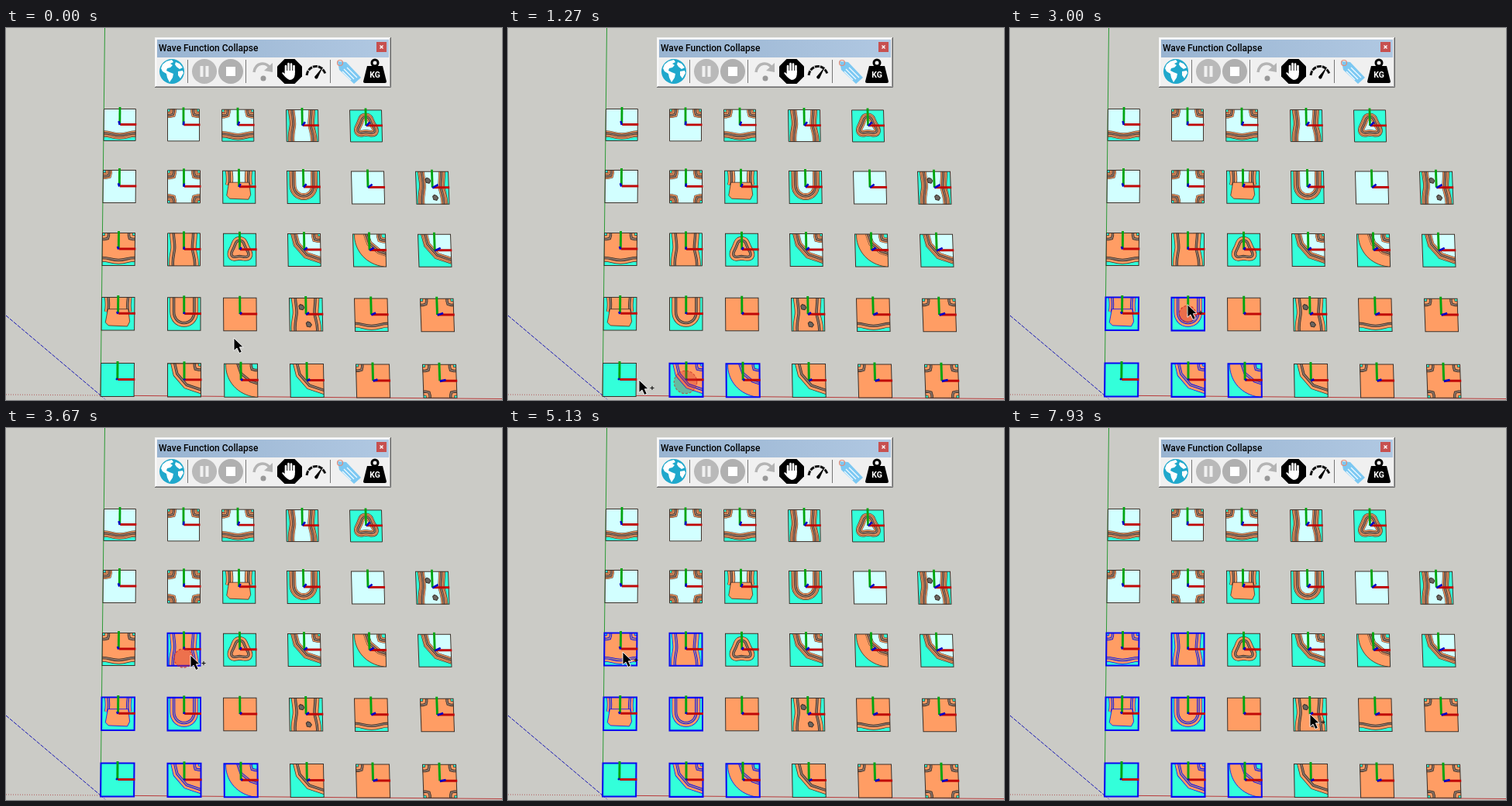
An HTML page that plays this animation: 640 by 480 pixels, repeating every 8 s.

```html
<!DOCTYPE html>
<html lang="en">
<head>
<meta charset="utf-8">
<title>Wave Function Collapse</title>
<style>
html, body { margin: 0; width: 100%; height: 100%; overflow: hidden; background: #cbcbc6; }
svg { display: block; width: 640px; height: 480px; }
text { font-family: Roboto, "Open Sans", sans-serif; }
.tile { --line: #3c3029; --ridge: #8c7467; --edge: 1; }
.tile.on { --line: #0a0af0; --ridge: #a07c8c; --edge: 2; }
.ink { stroke: var(--line); }
.ridge { stroke: var(--ridge); }
.frame { fill: none; stroke: var(--line); stroke-width: var(--edge); }
</style>
</head>
<body>
<svg viewBox="0 0 640 480">
  <defs>
    <clipPath id="cell"><path d="M0 0H42V42H0Z"/></clipPath>
    <linearGradient id="caption"><stop stop-color="#99b4d1"/><stop offset="1" stop-color="#b0c8e2"/></linearGradient>
  </defs>
  <rect width="640" height="480" fill="#cbcbc6"/>

  <g fill="none">
    <path d="M127.500 0L122 474" stroke="#2c9a35"/>
    <path d="M0 371L122 474" stroke="#1414b4" stroke-dasharray="5 1.500"/>
    <path d="M122 474L129 480" stroke="#0000d0" stroke-dasharray="1 2"/>
    <path d="M0 473L122 474" stroke="#b05858" stroke-dasharray="1 2"/>
    <path d="M122 474L640 478.500" stroke="#b83a3a"/>
  </g>

  <g id="tiles" fill="none"></g>

  <g id="toolbar">
    <rect x="192" y="12" width="305" height="65" fill="#f0f0f0"/>
    <path d="M193.500 75V13.500H495" fill="none" stroke="#fff"/>
    <path d="M192 76.500H496.500V12" fill="none" stroke="#696969"/>
    <path d="M193 75.500H495.500V13" fill="none" stroke="#a0a0a0"/>
    <rect x="195" y="15" width="299" height="23" fill="url(#caption)"/>
    <text x="197" y="30" font-size="12" font-weight="500">Wave Function Collapse</text>
    <rect x="478" y="18" width="13" height="13" fill="#c75050"/>
    <path d="M482.500 22.500l4 4m0-4l-4 4" stroke="#fff" stroke-width="1.300"/>
    <path d="M234.500 41V71M309.500 41V71M418.500 41V71" stroke="#777"/>

    <circle cx="214" cy="56" r="16" fill="#20a8cc"/>
    <path fill="#fff" d="M202 47l5-4 7-2 2 3-4 2 3 2-3 3-4 1-1 3 4 2 5 2-1 5-4 6-3-6-1-5-5-3-2-4zM219 44l5 2 4 5-4 2-4-3-2-3zM222 56l6-1 1 3-4 7-3-4z"/>

    <circle cx="256" cy="56" r="16" fill="#b9b9b9"/>
    <path d="M252.500 49V63M259.500 49V63" stroke="#f0f0f0" stroke-width="4"/>
    <circle cx="290" cy="56" r="16" fill="#b0b0b0"/>
    <rect x="284" y="50" width="12" height="12" fill="#fff"/>

    <path d="M320 57C322 44 335 43 341 52" fill="none" stroke="#b4b4b4" stroke-width="3.500"/>
    <path d="M344 45V57L333 55Z" fill="#b4b4b4"/>
    <circle cx="332" cy="65" r="3.500" fill="#999"/>

    <path d="M359.500 40H372.500L382 49.500V62.500L372.500 72H359.500L350 62.500V49.500Z"/>
    <path d="M361 58V49M364.500 56V46M368 56V46.500M371.500 57V49" stroke="#fff" stroke-width="2.600" stroke-linecap="round"/>
    <path d="M359.800 55H372.800V60Q372 67 366 67Q362 66 356 58Q357 56 360 59Z" fill="#fff"/>

    <path d="M388 61C390 47 407 45 412 59" fill="none" stroke="#111" stroke-width="3" stroke-dasharray="6 1"/>
    <path d="M398 63L409 50L402 65Q399 67 398 63Z"/>

    <path d="M428 43L439 44L458 64L449 72L430 54Z" fill="#7cc8f2"/>
    <circle cx="431" cy="45" r="3.500" fill="none" stroke="#e08a78" stroke-width="1.200"/>
    <path d="M436 53L449 66M440 51L453 64M434 56L445 67" stroke="#eef9ff" stroke-width="1.400"/>

    <circle cx="476" cy="45" r="4" fill="none" stroke="#000" stroke-width="3"/>
    <path d="M466 49H486L491 69Q491 71 489 71H463Q461 71 461 69Z"/>
    <text x="476" y="64" font-size="10.500" font-weight="700" fill="#fff" text-anchor="middle">KG</text>
  </g>

  <circle id="ripple" fill="#d02c28" fill-opacity=".5" stroke="#c82020" stroke-width="1.200" stroke-dasharray="3 2"/>
  <g id="cursor">
    <path d="M0 0V16.500L4 13L7 19.500L10.300 18L7.400 11.800H12.300Z" fill="#000" stroke="#fff" stroke-width=".9"/>
    <path id="plus" d="M14.500 10.500H19.500M17 8V13" stroke="#111" stroke-width="1.100"/>
  </g>
</svg>

<script>
const WATER = '#33ffda', SAND = '#ff9d64', SNOW = '#d2ffff';
const BOX = 'M-20-20H62V62H-20Z';

// Areas beyond a ridge inside a 42 x 42 tile; their borders carry the ridges.
const AREAS = {
  s: 'M-9 51V32H0C10 32 11 35 21 35S32 32 42 32H51V51Z',
  w: 'M-9-9H7C8 10 10 14 9 21S6 34 7 42V51H-9Z',
  e: 'M51-9H33C34 8 31 14 32 21S36 34 35 42V51H51Z',
  a: 'M-9-9H8V3L7 7L3 8H-9Z',
  b: 'M51-9H34V3L35 7L39 8H51Z',
  c: 'M51 51H34V39L35 35L39 34H51Z',
  d: 'M-9 51H8V39L7 35L3 34H-9Z',
  q: 'M9-9V0L12 13L24 27L42 33H60V60H-20V-9Z',
  x: 'M17-9V0L21 12L33 22L42 25H60V60H-20V-9Z',
  u: BOX + 'M8-21V18C8 37 34 37 34 18V-21Z',
  i: BOX + 'M21 9C27 9 26 15 30 21S33 31 26 30S21 29 16 30S8 28 12 21S15 9 21 9Z'
};
// Water edge of the tiles with a broad beach below ridge x.
const BEACH = 'M2-9V4C3 22 16 39 39 42V60H-20V-9Z';

// First letter is the land (p snow, o sand, ~ water), the rest are features.
const ROWS = [
  { y: 104, size: 41, xs: [126, 208, 278, 361, 443], kinds: 'ps pab pabs pwe pi' },
  { y: 183, size: 42, xs: [125, 208, 279, 362, 445, 528], kinds: 'pa pabcd pr pu p pwek' },
  { y: 264, size: 42, xs: [124, 208, 280, 363, 447, 531], kinds: 'oabs owe oi pqb pxb pq' },
  { y: 347, size: 42.5, xs: [123, 208, 280, 365, 449, 534], kinds: 'or ou o owek os oab' },
  { y: 432, size: 43, xs: [122, 208, 281, 366, 451, 537], kinds: '~ oqb oxb oq oa oabcd' }
];

const fill = (d, color, more = '') => `<path d="${d}" fill="${color}" fill-rule="evenodd" ${more}/>`;
const ink = (d, width) => `<path d="${d}" class="ink" stroke-width="${width}"/>`;
const line = (d, color, width) => `<path d="${d}" stroke="${color}" stroke-width="${width}"/>`;
const sand = (d, width) => ink(d, width + 1.4) + line(d, SAND, width);
const ridge = d => ink(d, 3.4) + `<path d="${d}" class="ridge" stroke-width="1.8"/>`;
const outlined = 'class="ink" stroke-width=".8"';

function ramp(land) {
  const walls = 'M8-3C9 8 10 12 8 19M34-3C33 8 32 12 34 19';
  const floor = land === SAND ? fill('M9-3H33V18H9Z', SAND) : '';
  return fill('M0 0H42V42H0Z', WATER) + fill('M8-3H34V18H8Z', land) +
    sand(walls, 8) + floor + ridge(walls) +
    fill('M8 15H34L36 31L33 37L9 36L5 32Z', SAND, outlined);
}

function rock(x, y) {
  return fill(`M${x - 3} ${y - 1}l2-2 3 1 2 3-2 3-4-1z`, '#6a6560', 'class="ink" stroke-width="1"');
}

function art(kind) {
  const land = { p: SNOW, o: SAND, '~': WATER }[kind[0]];
  const keys = [...kind.slice(1)].filter(k => AREAS[k]);
  const all = keys.map(k => AREAS[k]).join('');
  let out = fill('M0 0H42V42H0Z', land);
  if (kind.includes('r')) return out + ramp(land);
  if (keys.length) {
    out += fill(all, WATER);
    if (kind.includes('x')) out += fill(AREAS.x, SAND) + fill(BEACH, WATER, outlined);
    else out += sand(all, 9);
    out += fill(all + BOX, land);
    if (land === SNOW) out += `<g>${ink(all, 7)}${line(all, SAND, 6)}</g>`;
    out += ridge(all);
  }
  if (kind.includes('k')) out += rock(15, 11) + rock(24, 33);
  return out;
}

function tile(kind, x, y, size, row) {
  const s = size / 42, top = y + .5 + (x - 126) * .0045, lean = (x - 208) * 1.1e-4;
  return `<g class="tile" transform="matrix(${s} 0 ${lean} ${s} ${x + .5} ${top})">
    <g clip-path="url(#cell)">${art(kind)}</g><path class="frame" d="M0 0H42V42H0Z"/>
    ${line('M21 20.500V-2.500', '#00a510', 2.9)}${line('M21.500 20.500H43', '#c00808', 2.9)}
    ${line(`M21 21l${(x - 190) / 45} ${row * .8 - 5}`, '#0000c8', 2.6)}</g>`;
}

const $ = id => document.getElementById(id);
$('tiles').innerHTML = ROWS.map((r, row) =>
  r.kinds.split(' ').map((kind, i) => tile(kind, r.xs[i], r.y, r.size, row)).join('')).join('');
const tiles = [...document.querySelectorAll('.tile')];

const LOOP = 8000, STEP = 1000 / 15, RIPPLE = 470;
const PATH = [
  [0, 294, 400], [70, 294, 400], [470, 301, 447], [670, 301, 447], [930, 226, 457],
  [1000, 228, 457], [1130, 228, 457], [1260, 169, 454], [1470, 167, 454], [1730, 167, 454],
  [1930, 144, 453], [2070, 144, 453], [2230, 157, 369], [2330, 157, 369], [2400, 155, 366],
  [2600, 155, 366], [2800, 229, 369], [2930, 229, 369], [3200, 229, 296], [3530, 229, 297],
  [3660, 238, 293], [4200, 238, 293], [4400, 148, 289], [6330, 148, 289], [6790, 194, 272],
  [7600, 194, 272], [7930, 387, 369], [LOOP, 387, 369]
];
// time, x, y, tile
const CLICKS = [
  [590, 300, 447, 25], [990, 229, 457, 24], [1930, 144, 453, 23], [2240, 157, 369, 17],
  [2800, 229, 369, 18], [3440, 229, 297, 12], [4660, 148, 289, 11]
];

function position(t) {
  const i = PATH.findIndex(p => p[0] > t);
  const [t0, x0, y0] = PATH[i - 1], [t1, x1, y1] = PATH[i];
  const p = (t - t0) / (t1 - t0), k = p * p * (3 - 2 * p);
  return [x0 + (x1 - x0) * k, y0 + (y1 - y0) * k];
}

function draw() {
  const t = Math.floor((performance.now() % LOOP) / STEP + .05) * STEP % LOOP;
  $('cursor').setAttribute('transform', `translate(${position(t)})`);
  $('plus').style.display = (t > 860 && t < 6390) || t > 7850 ? '' : 'none';

  for (const [time, , , index] of CLICKS) tiles[index].classList.toggle('on', t >= time + 70);

  const click = CLICKS.find(c => t >= c[0] && t < c[0] + RIPPLE);
  const ripple = $('ripple');
  ripple.style.display = click ? '' : 'none';
  if (click) {
    const age = (t - click[0]) / RIPPLE;
    ripple.setAttribute('cx', click[1]);
    ripple.setAttribute('cy', click[2]);
    ripple.setAttribute('r', 25 * age);
    ripple.style.opacity = 1 - age * age;
  }
  requestAnimationFrame(draw);
}
draw();
</script>
</body>
</html>
```
